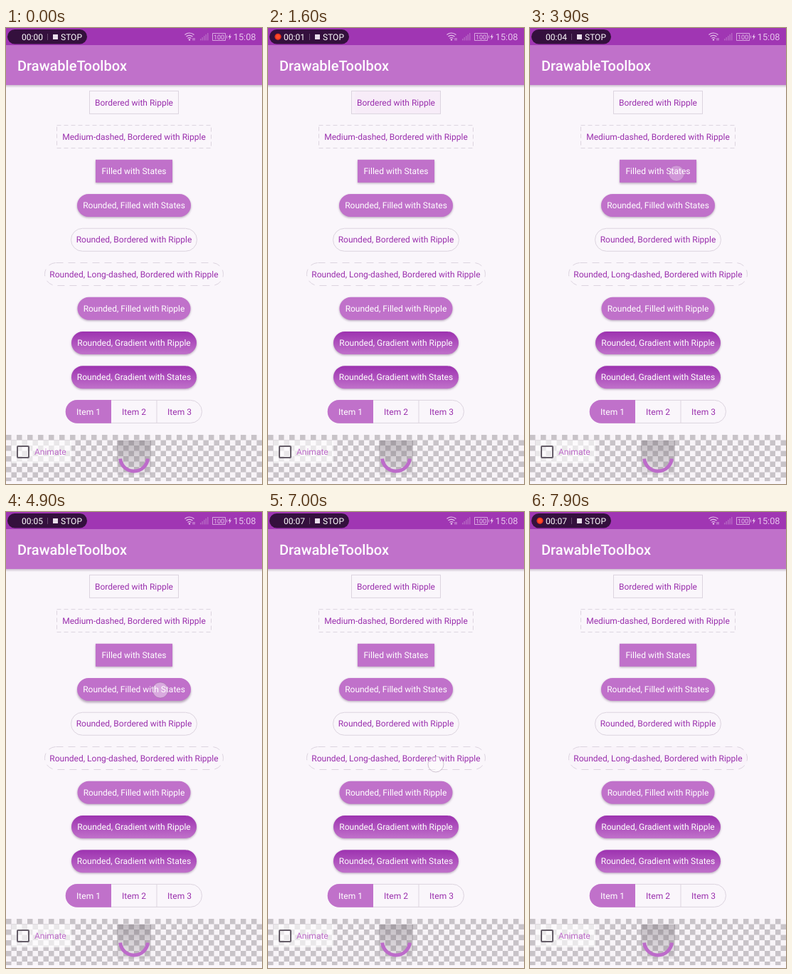
Animation, 360 px wide and 640 px high, one loop 8000 ms. Source, as an HTML page:

```html
<!DOCTYPE html>
<html lang="en">
<head>
<meta charset="utf-8">
<title>DrawableToolbox</title>
<style>
  html, body { margin: 0; width: 100%; height: 100%; overflow: hidden; background: #faf6fb; }
  svg { display: block; width: 360px; height: 640px; font-family: Roboto, sans-serif; text-rendering: geometricPrecision; }
  .label { font-size: 12px; text-anchor: middle; }
</style>
</head>
<body>
<svg id="stage" viewBox="0 0 360 640">
  <defs>
    <linearGradient id="grad" x1="0" y1="0" x2="0" y2="1">
      <stop offset="0" stop-color="#9d32b0"/><stop offset="1" stop-color="#c071ca"/>
    </linearGradient>
    <linearGradient id="drop" x1="0" y1="0" x2="0" y2="1">
      <stop offset="0" stop-color="#604065" stop-opacity=".3"/>
      <stop offset="1" stop-color="#604065" stop-opacity="0"/>
    </linearGradient>
    <linearGradient id="shade" x1="0" y1="0" x2="0" y2="1">
      <stop offset="0" stop-color="#6b626b" stop-opacity=".38"/>
      <stop offset="1" stop-color="#6b626b" stop-opacity=".1"/>
    </linearGradient>
    <pattern id="check" y="571" width="15" height="15" patternUnits="userSpaceOnUse">
      <path fill="#f8f4f8" d="M0 0h15v15H0z"/>
      <path fill="#c8c3c8" d="M0 0h7.5v7.5H0zM7.5 7.5H15V15H7.5z"/>
    </pattern>
    <filter id="blur" x="-20%" y="-50%" width="140%" height="200%"><feGaussianBlur stdDeviation="1.5"/></filter>
  </defs>

  <path fill="#faf6fb" d="M0 0h360v640H0z"/>
  <path fill="#c071ca" d="M0 24h360v56H0z"/>
  <path fill="url(#drop)" d="M0 80h360v4H0z"/>
  <path fill="#a036b3" d="M0 0h360v24H0z"/>
  <text x="16" y="59.5" font-size="20" font-weight="500" fill="#fff">DrawableToolbox</text>

  <rect x="2" y="2" width="112" height="20.5" rx="10.2" fill="#34103d"/>
  <g id="rec"><circle cx="14" cy="12.3" r="4.6" fill="#e5331f"/><circle cx="14" cy="12.3" r="3" fill="#ff4a2a"/></g>
  <g font-size="12" fill="#fff">
    <text id="clock" x="22" y="16.7">00:00</text>
    <text x="77" y="16.7">STOP</text>
  </g>
  <path stroke="#684a70" d="M58.5 8v9"/>
  <path fill="#e9deeb" d="M66 9h7v7h-7z"/>

  <g fill="none" stroke="#e6c3ec" stroke-width="1.2">
    <path d="M251.5 9.5q6.500-5 13 0M253.5 12q4.500-3.400 9 0M255.5 14.5q2.500-2 5 0"/>
    <path stroke-width=".8" d="M263 14v3.500M265 14v3.500"/>
    <path stroke-width=".8" d="M290.5 7.5h18v10h-18zM310.5 10.5v4"/>
  </g>
  <circle cx="258" cy="16.5" r="1.2" fill="#e6c3ec"/>
  <path fill="#b565c3" d="M273 15h1.5v2.5H273zM275.5 13H277v4.5h-1.500zM278 11h1.5v6.5H278zM280.5 9H282v8.5h-1.500zM283 7h1.5v10.5H283z"/>
  <text x="299.5" y="15.8" font-size="9" fill="#e6c3ec" text-anchor="middle">100</text>
  <path fill="#e6c3ec" d="M315.5 8l-3 5h2l-1 4 3.500-5.500h-2z"/>
  <text x="319.7" y="17" font-size="12.8" fill="#e6c3ec">15:08</text>

  <g id="list"></g>

  <path fill="url(#check)" d="M0 571h360v65H0z"/>
  <path fill="#fff" fill-opacity=".6" d="M8 579h84v32H8z"/>
  <rect x="16" y="587" width="16" height="16" rx="1" fill="none" stroke="#655d68" stroke-width="2"/>
  <text x="40" y="599" font-size="12" fill="#bd6bc9">Animate</text>
  <path fill="url(#shade)" d="M156 579h48v48h-48z"/>
  <path fill="none" stroke="#bd6bca" stroke-width="5" d="M160.6 604.5a19.500 19.500 0 0 0 38.800 0"/>

  <g id="dot"><circle r="11" fill="#fff" fill-opacity=".4" stroke="#6b4a70" stroke-opacity=".3"/></g>
</svg>
<script>
const LOOP = 8000, MAIN = '#c071ca', DARK = '#9a2fad', EDGE = '#dcd4df';
const $ = id => document.getElementById(id);
const clamp = v => Math.max(0, Math.min(1, v));
const ramp = (t, from, len) => clamp((t - from) / len);

function add(parent, tag, attrs, text) {
  const el = document.createElementNS('http://www.w3.org/2000/svg', tag);
  for (const k in attrs) el.setAttribute(k, attrs[k]);
  if (text) el.textContent = text;
  parent.append(el);
  return el;
}

// label, left edge, corner radius, fill, dash
const rows = [
  ['Bordered with Ripple', 117, 0, null, ''],
  ['Medium-dashed, Bordered with Ripple', 71, 0, null, '6 4'],
  ['Filled with States', 126, 0, MAIN],
  ['Rounded, Filled with States', 100, 16, MAIN],
  ['Rounded, Bordered with Ripple', 91, 16, null, ''],
  ['Rounded, Long-dashed, Bordered with Ripple', 54, 16, null, '10 7'],
  ['Rounded, Filled with Ripple', 100.5, 16, MAIN],
  ['Rounded, Gradient with Ripple', 92, 16, 'url(#grad)'],
  ['Rounded, Gradient with States', 92, 16, 'url(#grad)']
];
const midY = i => 104.4 + 48.22 * i;

const buttons = rows.map(([label, x, rx, fill, dash], i) => {
  const g = add($('list'), 'g', {}), cy = midY(i);
  const box = { x, y: cy - 16, width: 360 - 2 * x, height: 32, rx };
  const b = { cy, half: 180 - x };
  if (fill) {
    b.shadow = add(g, 'rect', { ...box, fill: '#4b2852', opacity: .38, filter: 'url(#blur)' });
    b.shadow.setAttribute('transform', 'translate(0 1.2)');
    add(g, 'rect', { ...box, fill });
    b.press = add(g, 'rect', { ...box, fill: DARK, opacity: 0 });
  } else {
    const clip = add(g, 'clipPath', { id: 'clip' + i });
    add(clip, 'rect', box);
    b.wash = add(g, 'rect', { ...box, fill: MAIN, opacity: 0 });
    b.wave = add(add(g, 'g', { 'clip-path': `url(#clip${i})` }), 'circle', { fill: MAIN, opacity: 0 });
    add(g, 'rect', {
      x: x + .5, y: cy - 16, width: 359 - 2 * x, height: 32, rx,
      fill: 'none', stroke: EDGE, 'stroke-dasharray': dash || 'none'
    });
  }
  add(g, 'text', { class: 'label', x: 180, y: cy + 4.2, fill: fill ? '#fff' : DARK }, label);
  return b;
});

const bar = $('list'), barY = midY(9);
add(bar, 'rect', { x: 84.5, y: barY - 16, width: 191, height: 32, rx: 16, fill: 'none', stroke: EDGE });
add(bar, 'path', { fill: MAIN, d: `M148 ${barY - 16.3}h-48a16.3 16.3 0 0 0 0 32.6h48z` });
add(bar, 'path', { stroke: EDGE, d: `M212 ${barY - 16}v32` });
[1, 2, 3].forEach(n => add(bar, 'text', {
  class: 'label', x: 52 + 64 * n, y: barY + 4.2, fill: n === 1 ? '#fff' : DARK
}, 'Item ' + n));

// row, touch x, touch y, finger down, finger up
const taps = [
  [0, 218, 107, 950, 1200],
  [1, 228, 156, 2400, 2680],
  [2, 206, 204, 3850, 4130],
  [3, 217, 250, 4800, 5080],
  [4, 226, 301, 5920, 6220],
  [5, 236, 354, 6920, 7460]
];
const ticks = [0, 890, 1890, 2890, 3890, 4890, 5890, 6980];

function touch(t, [row, x, y, down, up]) {
  const b = buttons[row], start = down + 100;
  if (b.press) {
    const on = ramp(t, start, 120) * (1 - ramp(t, up, 150));
    const lift = ramp(t, down + 30, 100) * (1 - ramp(t, up, 120));
    b.press.setAttribute('opacity', on);
    b.shadow.setAttribute('transform', `translate(0 ${1.2 + lift * 1.7})`);
  } else {
    const fade = ramp(t, start, 120) * (1 - ramp(t, up, 460));
    const p = ramp(t, start, 500);
    b.wash.setAttribute('opacity', .34 * fade);
    b.wave.setAttribute('opacity', .2 * fade);
    b.wave.setAttribute('cx', x + (180 - x) * p * .8);
    b.wave.setAttribute('cy', y + (b.cy - y) * p);
    b.wave.setAttribute('r', p * Math.hypot(b.half, 16) * 1.02);
  }
  const seen = ramp(t, down, 75) * (1 - ramp(t, up - 20, 80));
  if (seen > 0) {
    $('dot').setAttribute('transform', `translate(${x} ${y})`);
    $('dot').setAttribute('opacity', seen);
  }
}

function draw(t) {
  const sec = ticks.filter(s => s <= t).length - 1;
  $('clock').textContent = '00:0' + sec;
  $('rec').setAttribute('opacity', t - ticks[sec] >= 500 ? 1 : 0);
  $('dot').setAttribute('opacity', 0);
  taps.forEach(tap => touch(t, tap));
}

const begin = performance.now();
function frame() {
  draw((performance.now() - begin) % LOOP);
  requestAnimationFrame(frame);
}
draw(0);
requestAnimationFrame(frame);
</script>
</body>
</html>
```
